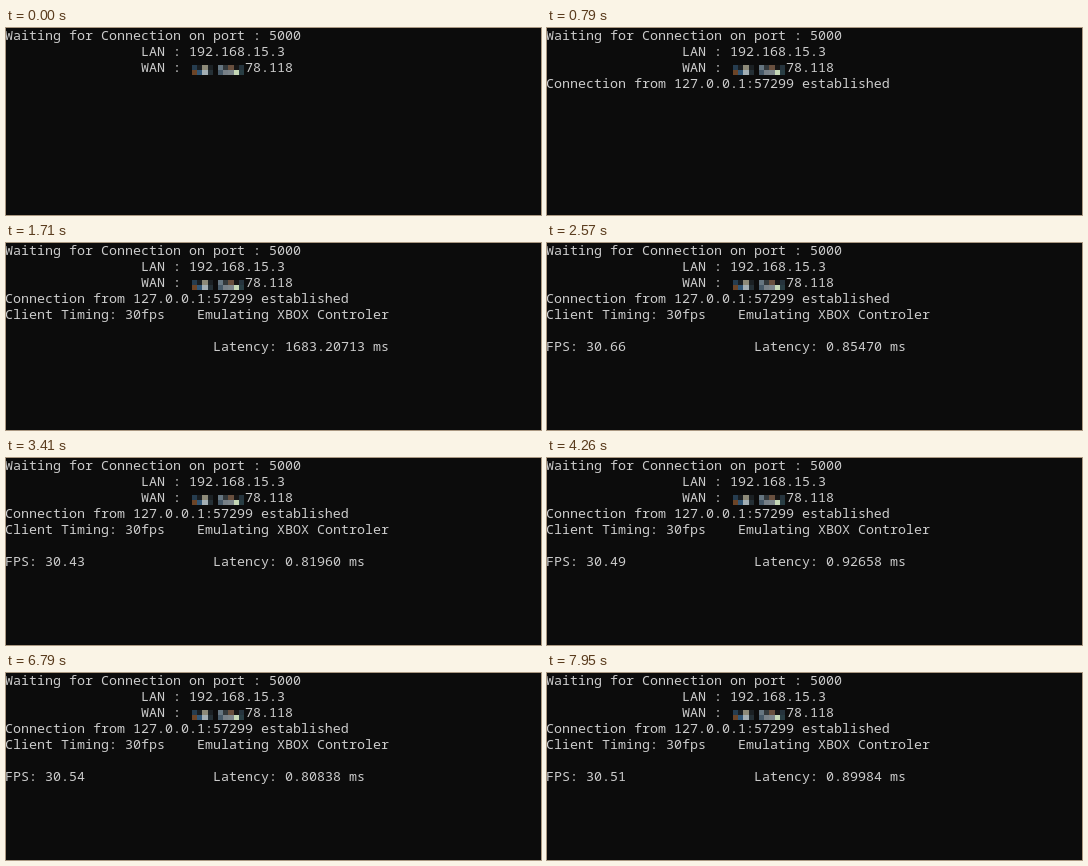
Recreate the animation shown at these times as an HTML page. Size 535 by 187 pixels, loop 8000 ms.

```html
<!DOCTYPE html>
<html lang="en">
<head>
<meta charset="utf-8">
<title>Controller server console</title>
<style>
  html, body { margin: 0; width: 100%; height: 100%; overflow: hidden; background: #0c0c0c; }
  svg { display: block; width: 535px; height: 187px; }
  text { font: 13.3333px "Noto Sans Mono", monospace; fill: #ccc; white-space: pre; }
</style>
</head>
<body>
<svg id="console" viewBox="0 0 535 187">
  <g id="mosaic" shape-rendering="crispEdges"></g>
</svg>
<script>
const LOOP = 8000, CELL = 8, LINE = 16;
const NS = "http://www.w3.org/2000/svg";
const screen = document.getElementById("console");

function add(parent, tag, attributes) {
  const node = document.createElementNS(NS, tag);
  for (const key in attributes) node.setAttribute(key, attributes[key]);
  return parent.appendChild(node);
}

function print(column, row, content = "") {
  const node = add(screen, "text", { x: column * CELL - 1, y: row * LINE + 12 });
  node.textContent = content;
  return node;
}

print(0, 0, "Waiting for Connection on port : 5000");
print(17, 1, "LAN : 192.168.15.3");
print(17, 2, "WAN :");
print(30, 2, "78.118");

// Pixelated part of the address
const mosaic = document.getElementById("mosaic");
[
  "#263d50 #191d20 #8d8a78 #1b2023 #0c0c0c #667681 #32383b #69503f #151515 #26343d",
  "#6b4427 #315675 #a3afb4 #253036 #0c0c0c #465968 #778087 #7c858a #c5d8b6 #293e44"
].forEach((colors, row) => colors.split(" ").forEach((fill, column) =>
  add(mosaic, "rect", { x: 186 + column * 5.2, y: 37 + row * 5, width: 5.2, height: 5, fill })));

// Each output field holds [start time, content] pairs.
const fields = [
  [print(0, 3), [[790, "Connection from 127.0.0.1:57299 established"]]],
  [print(0, 4), [[830, "Client Timing: 30fps"]]],
  [print(24, 4), [[870, "Emulating XBOX Controler"]]],
  [print(0, 6), [
    [1890, "30.66"], [2880, "30.43"], [3890, "30.49"], [4920, "30.59"],
    [5890, "30.54"], [6920, "30.57"], [7950, "30.51"]
  ], value => `FPS: ${value}`],
  [print(26, 6), [
    [1710, "1683.20713"], [2570, "0.85470"], [3410, "0.81960"], [4260, "0.92658"],
    [5100, "0.75592"], [5950, "0.83147"], [6790, "0.80838"], [7610, "0.89984"]
  ], value => `Latency: ${value} ms`]
];

function render(time) {
  for (const [node, steps, format = value => value] of fields) {
    const step = steps.filter(([start]) => start <= time).pop();
    const content = step ? format(step[1]) : "";
    if (node.textContent !== content) node.textContent = content;
  }
}

function tick() {
  render(performance.now() % LOOP);
  requestAnimationFrame(tick);
}
tick();
</script>
</body>
</html>
```
